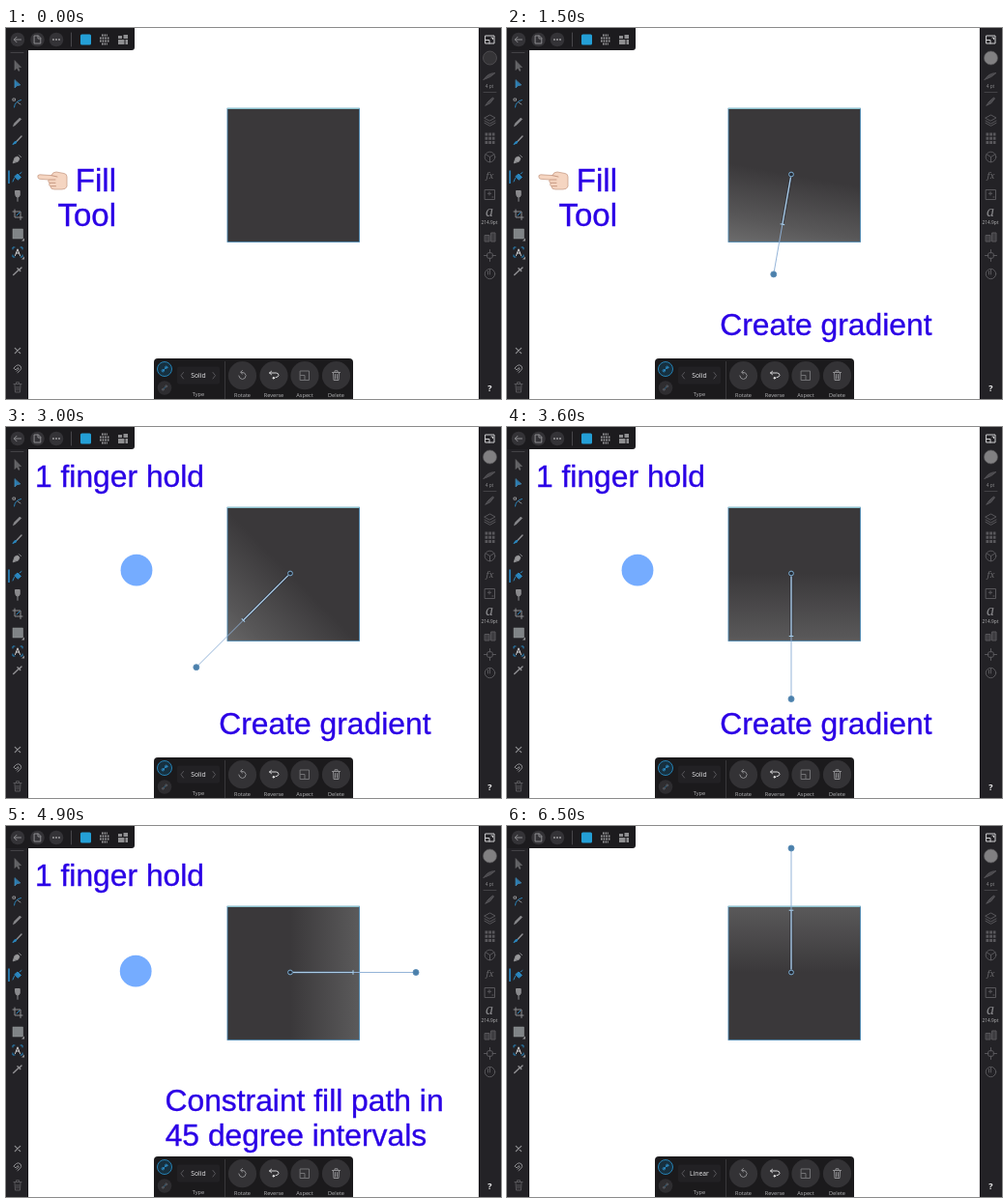
These frames come from a looping animation (512 by 384 pixels, 7100 ms). An HTML page:

```html
<!DOCTYPE html>
<html lang="en">
<head>
<meta charset="utf-8">
<title>Gradient fill tool</title>
<style>
html, body { margin: 0; width: 100%; height: 100%; overflow: hidden; background: #fff; }
svg { display: block; width: 100vw; height: 100vh; }
.caption { font: 31.8px "Liberation Sans", Arial, sans-serif; fill: #2b00e6; stroke: #2b00e6; stroke-width: .35; }
.ui { font-family: "Open Sans", Roboto, sans-serif; font-size: 5.6px; fill: #b4b4b6; text-anchor: middle; }
.icon { fill: none; stroke: #8e8e91; stroke-width: 1; stroke-linecap: round; stroke-linejoin: round; }
.dim { stroke: #58575b; }
.blue { stroke: #2b86bd; }
.bright { stroke: #d2d2d4; }
</style>
</head>
<body>
<svg viewBox="0 0 512 384" preserveAspectRatio="none">
  <defs>
    <linearGradient id="ramp" gradientUnits="userSpaceOnUse" x1="294" y1="151" x2="294" y2="281">
      <stop offset="0" stop-color="#3a383a"/>
      <stop offset=".5" stop-color="#585758"/>
      <stop offset="1" stop-color="#7e7e7e"/>
    </linearGradient>
  </defs>
  <rect width="512" height="384" fill="#fff"/>

  <!-- artwork -->
  <rect id="box" x="229" y="83.2" width="136.5" height="138.2" fill="#3a383a" stroke="#4a86b0" stroke-width=".9"/>
  <path d="M229 83.2H365.5" stroke="#9fd8de" stroke-width="1.1"/>
  <g id="path" fill="none">
    <path id="shade" stroke="#202430" stroke-opacity=".6" stroke-width="3"/>
    <path id="far" stroke="#8fb0d6" stroke-width=".95"/>
    <path id="near" stroke="#a9cbe8" stroke-width="1.4"/>
    <path id="tick" stroke="#a5cbe8" stroke-width="1.1"/>
    <circle cx="294" cy="151.5" r="2.4" fill="#252c36" stroke="#7fb0d6"/>
    <circle id="end" r="3" fill="#4b80ab" stroke="#5c8db6" stroke-width=".9"/>
  </g>

  <!-- captions -->
  <g id="fillTool">
    <g class="caption" text-anchor="end" style="font-size:33px">
      <text x="114" y="169">Fill</text><text x="114" y="205">Tool</text>
    </g>
    <path d="M33 154.5Q32 152 35 151.8L47 152.6Q48 149 52 149L60 150.5Q63 151 63 154V164Q62 167 58 167H50Q46 167 46 164Q44 163 45 160.5Q43 159 44 157L35 156.3Q33 156 33 154.5Z" fill="#f5d5c1" stroke="#c99f89" stroke-width=".8"/>
    <path d="M44.5 157H51M45 160.3H51M46.5 163.7H51.5M47 152.6L53 154" fill="none" stroke="#c2927b" stroke-width=".9" stroke-linecap="round"/>
  </g>
  <text id="create" class="caption" x="220.3" y="318">Create gradient</text>
  <g id="hold">
    <text class="caption" x="30" y="62">1 finger hold</text>
    <circle id="finger" cx="135" cy="148" r="16.4" fill="#75acff"/>
  </g>
  <g id="constraint" class="caption">
    <text x="164.5" y="295">Constraint fill path in</text>
    <text x="164.7" y="331">45 degree intervals</text>
  </g>

  <!-- bars -->
  <path d="M0 0H23V384H0ZM489 0H512V384H489Z" fill="#232226"/>
  <path d="M22.6 23V384M489.4 0V384" stroke="#121114" stroke-width=".8"/>
  <path d="M0 0H133V20Q133 23 130 23H0Z" fill="#1c1b1e"/>
  <path d="M153 384V346Q153 342 157 342H355Q359 342 359 346V384Z" fill="#1b1a1c"/>

  <!-- top tools -->
  <g fill="#343337"><circle cx="12" cy="12" r="7.3"/><circle cx="32.5" cy="12" r="7.3"/><circle cx="52" cy="12" r="7.3"/></g>
  <g class="icon">
    <path d="M15.5 12H8.5M11 9.3L8.3 12L11 14.7"/>
    <path d="M29.5 8H33.5L35.8 10.3V16H29.5ZM33 8V11H35.8"/>
    <path d="M67.5 5V19" stroke="#48474b"/>
  </g>
  <g fill="#a4a4a6"><circle cx="49" cy="12" r=".9"/><circle cx="52" cy="12" r=".9"/><circle cx="55" cy="12" r=".9"/></g>
  <rect x="77" y="6.5" width="11" height="11" rx="1.5" fill="#249fd6"/>
  <path d="M99 7.5H105M97 10.5H107M97 13.5H107M99 16.5H105" stroke="#98989a" stroke-width="1.9" stroke-dasharray="1.7 .9"/>
  <path d="M116 8H120V11H116ZM116 12H122.5V17H116ZM121.5 7H126V11H121.5ZM123.5 12H126V17H123.5Z" fill="#8e8e90"/>

  <!-- left tools -->
  <g class="icon">
    <path d="M5 25.5H18" stroke="#434246"/>
    <path d="M9 34V43.5L11.3 41.2L13 44.5L14 44L12.5 40.6H15.2Z" fill="#626265" stroke="#727275" stroke-width=".6"/>
    <path d="M9 54V62L11.3 59.8L14.5 59Z" fill="#2a7db2" stroke="#4a8fb9" stroke-width=".7"/>
    <path class="blue" d="M8.5 82Q9 76 15.5 74.5"/><path d="M7.3 73H9.5V75.2H7.3ZM12 77L15 79"/>
    <path d="M7.5 101.5L8.5 98.8L14.3 93L15.7 94.4L9.9 100.3Z" fill="#88888b" stroke-width=".6"/>
    <path d="M11.3 117L16 112" stroke-width="1.5"/><path class="blue" d="M7.3 120.3Q8.3 116.8 11 117.3Q11.5 119.7 7.3 120.3Z" fill="#2a7db2"/>
    <path d="M7.3 139.5L9 134.3L12 133L14 135L12.7 137.8ZM13.5 131.7L15.5 133.7" fill="#98989a"/>
    <path d="M3 147.5V161" stroke="#2b8fcf" stroke-width="1.5" stroke-linecap="butt"/>
    <path class="blue" d="M7 159L8.5 155.5M9 153.5L12 151L15.5 154.5L12.5 157ZM14 151L16 149.5" fill="#2a86bf"/>
    <path d="M9.8 168.5H14.2V173Q14 175 12 175Q10 175 9.8 173ZM12 175V179.3" fill="#8a8a8d"/>
    <path d="M9 188V196H17M7 190H15V198.5"/><path class="blue" d="M11 194L14 191"/>
    <path d="M19 217.5V220.5H16Z" fill="#959598" stroke="none"/>
    <path class="blue" d="M7 229V227H9M15 227H17V229M17 235V237H15M9 237H7V235"/>
    <path class="bright" d="M9.5 235.5L12 228.8L14.5 235.5M10.4 233H13.6"/>
    <path d="M19 236.5V239.5H16Z" fill="#959598" stroke="none"/>
    <path d="M7.7 255.5L12.7 250.7M12 248.8L14.7 251.5M14 250L16 248" stroke-width="1.5"/>
    <path d="M9.3 331.3L14.7 336.7M14.7 331.3L9.3 336.7" stroke-width="1.2"/>
    <path d="M8 352L10.5 349.5Q13 347.8 15 350Q16.6 352.5 14.5 354.5L12 356.7M8.5 352.5L10 354L12 351.7Q13.6 352 13 353.2L11 355.2"/>
    <path class="dim" d="M8 368.5H16M10.5 368V366.7H13.5V368M9 369L9.5 377H14.5L15 369M11 371V375M13 371V375"/>
  </g>
  <rect x="7" y="208" width="10.5" height="10" fill="#808487" stroke="#979a9c" stroke-width=".5"/>

  <!-- right tools -->
  <circle id="swatch" cx="500.5" cy="31" r="7" stroke="#59585b" stroke-width=".7"/>
  <g class="icon dim">
    <path class="bright" d="M496 8H505V16H496ZM496 12.5H500V16M502 10H503.5V11.5"/>
    <path d="M494 53.5Q498 46.5 506 46.5Q502 51 494 53.5Z" fill="#4b4a4e" stroke-width=".7"/>
    <path d="M494 66.5H507" stroke="#434246"/>
    <path d="M496 80L499 76L503.5 72L504.5 73L501 77.5Z" fill="#4b4a4e"/>
    <path d="M495 93L500.5 90L506 93L500.5 96ZM495 96L500.5 99L506 96M495 98.3L500.5 101.3L506 98.3"/>
    <path d="M495.5 110H505.5M495.5 114.3H505.5M495.5 118.6H505.5" stroke-width="3" stroke-dasharray="2.8 .9" stroke-linecap="butt"/>
    <circle cx="500.5" cy="133.5" r="5.3"/><path d="M500.5 133.5L496 130.7M500.5 133.5L505 130.7M500.5 133.5V138.8"/>
    <path d="M495.5 167.5H505.5V177.5H495.5ZM498.3 171.3H501.7M500 169.6V173M503 175H504"/>
    <path d="M495.5 214.5H500V221H495.5ZM502 212H506V221H502Z" fill="#3d3c40"/>
    <circle cx="500.5" cy="235.5" r="3.2"/><path d="M500.5 229.5V233M500.5 238V241.5M494.5 235.5H498M503 235.5H506.5"/>
    <circle cx="500.5" cy="254.5" r="5.2"/><path d="M500.5 250V255M498.5 251.5V255"/>
  </g>
  <g class="ui" style="font-size:4.8px">
    <text x="500" y="61.5" fill="#8c8c8e">4 pt</text><text x="500" y="203">214.9pt</text>
    <text x="500.5" y="156" font-style="italic" style="font:italic 9px 'Noto Serif',serif" fill="#68676a">fx</text>
    <text x="500" y="195" style="font:italic 16px 'Liberation Serif',serif" fill="#88888b">a</text>
    <text x="500.5" y="375.5" style="font:bold 9px 'Open Sans',sans-serif" fill="#eee">?</text>
  </g>

  <!-- context panel -->
  <path d="M226.5 345V384" stroke="#39383b"/>
  <circle cx="164" cy="353" r="7.5" fill="#17303f" stroke="#2681b3"/>
  <circle cx="164" cy="372.5" r="7.3" fill="#2e2d30"/>
  <g class="icon">
    <path class="blue" d="M162 355L166 351"/><circle class="blue" cx="162.3" cy="354.7" r="1.2"/><circle class="blue" cx="165.7" cy="351.3" r="1.2"/>
    <path class="blue" d="M162 374.5L166 370.5" stroke-opacity=".7"/><circle class="dim" cx="165.7" cy="370.8" r="1"/><circle class="dim" cx="162.3" cy="374.2" r="1"/>
  </g>
  <rect x="177" y="350.5" width="44" height="18" rx="2" fill="#222124"/>
  <path class="icon dim" d="M183.5 356.5L181 359.7L183.5 363M214 356.5L216.5 359.7L214 363"/>
  <g fill="#333235"><circle cx="244.5" cy="359.7" r="14.6"/><circle cx="277" cy="359.7" r="14.6"/><circle cx="309" cy="359.7" r="14.6"/><circle cx="341.5" cy="359.7" r="14.6"/></g>
  <g class="icon">
    <path d="M243.5 356.3Q247.5 356 248.2 359.5Q248 363.3 244.5 363.5Q241.3 363.2 240.8 360M244.5 354.5L242.5 356.3L244.5 358"/>
    <path class="bright" d="M272.5 357H279.5Q282 357.3 282 359.5Q281.5 361.5 279 361.7M274.5 355.3L272.5 357L274.5 358.7"/><circle cx="276.8" cy="362.3" r=".8" fill="#eee" stroke="#eee"/>
    <path d="M304.5 355H313.5V364.5H304.5ZM304.5 359.5H309V364.5" stroke="#727275"/>
    <path d="M337.5 356.5H345.5M340 356V354.8H343V356M338.5 357L339 364.5H344L344.5 357M340.5 358.5V363M342.5 358.5V363"/>
  </g>
  <g class="ui">
    <text id="type" x="199" y="362" style="font-size:6.8px" fill="#e8e8ea">Solid</text>
    <text x="199" y="380.8">Type</text>
    <text x="244.5" y="381.5">Rotate</text><text x="277" y="381.5">Reverse</text><text x="309" y="381.5">Aspect</text><text x="341.5" y="381.5">Delete</text>
  </g>
</svg>
<script>
const LOOP = 7100, STEP = 100, CX = 294, CY = 151.5;
const $ = id => document.getElementById(id);
const show = (id, on) => $(id).style.display = on ? "" : "none";
const set = (id, attrs) => { for (const k in attrs) $(id).setAttribute(k, attrs[k]); };

// Pointer around the start handle: time, angle in degrees, radius
const keys = [
  [800, 93, 7], [900, 93, 18.5], [1500, 100, 105], [2000, 122, 145], [2400, 135.8, 156],
  [2900, 124, 145], [3600, 90, 130], [4300, 45, 150], [4900, -10, 132], [5500, -90, 128.5]
];

function pointer(t) {
  let i = 1;
  while (i < keys.length - 1 && t > keys[i][0]) i++;
  const [t0, a0, r0] = keys[i - 1], [t1, a1, r1] = keys[i];
  const p = Math.min(1, Math.max(0, (t - t0) / (t1 - t0)));
  return [a0 + (a1 - a0) * p, r0 + (r1 - r0) * p];
}

function drawPath(t) {
  let [angle, r] = pointer(t);
  if (t >= 2900) {
    const snapped = Math.round(angle / 45) * 45;
    r *= Math.cos((angle - snapped) * Math.PI / 180);
    angle = snapped;
  }
  const ux = Math.cos(angle * Math.PI / 180), uy = Math.sin(angle * Math.PI / 180);
  const at = (d, side = 0) => `${CX + ux * d - uy * side} ${CY + uy * d + ux * side}`;
  const x = CX + ux * r, y = CY + uy * r, short = r < 40;
  set("ramp", { x1: CX, y1: CY, x2: x, y2: y });
  set("shade", { d: `M${at(3)}L${at(r / 2)}` });
  set("near", { d: `M${at(3)}L${at(r / 2)}` });
  set("far", { d: `M${at(r / 2)}L${at(r)}` });
  set("tick", { d: `M${at(r / 2, -2.3)}L${at(r / 2, 2.3)}` });
  set("end", { cx: x, cy: y, r: short ? 3.8 : 3, stroke: short ? "#a8d3f2" : "#5c8db6" });
}

function draw(t) {
  const drawn = t >= 800;
  show("path", drawn);
  set("box", { fill: drawn ? "url(#ramp)" : "#3a383a" });
  set("swatch", { fill: drawn ? "#818082" : "#353437" });
  if (drawn) drawPath(t);
  show("fillTool", t < 2900);
  show("create", t >= 800 && t < 4000);
  show("hold", t >= 2900 && t < 6000);
  show("constraint", t >= 4000 && t < 6000);
  const drift = Math.min(1, Math.max(0, (t - 3600) / 600));
  set("finger", { cx: 135 - drift * .8, cy: 148.2 + drift * 2 });
  $("type").textContent = t >= 6000 ? "Linear" : "Solid";
}

const start = performance.now();
function tick(now) {
  const t = Math.max(0, now - start) % LOOP;
  draw(Math.floor(t / STEP) * STEP);
  requestAnimationFrame(tick);
}
draw(0);
requestAnimationFrame(tick);
</script>
</body>
</html>
```
